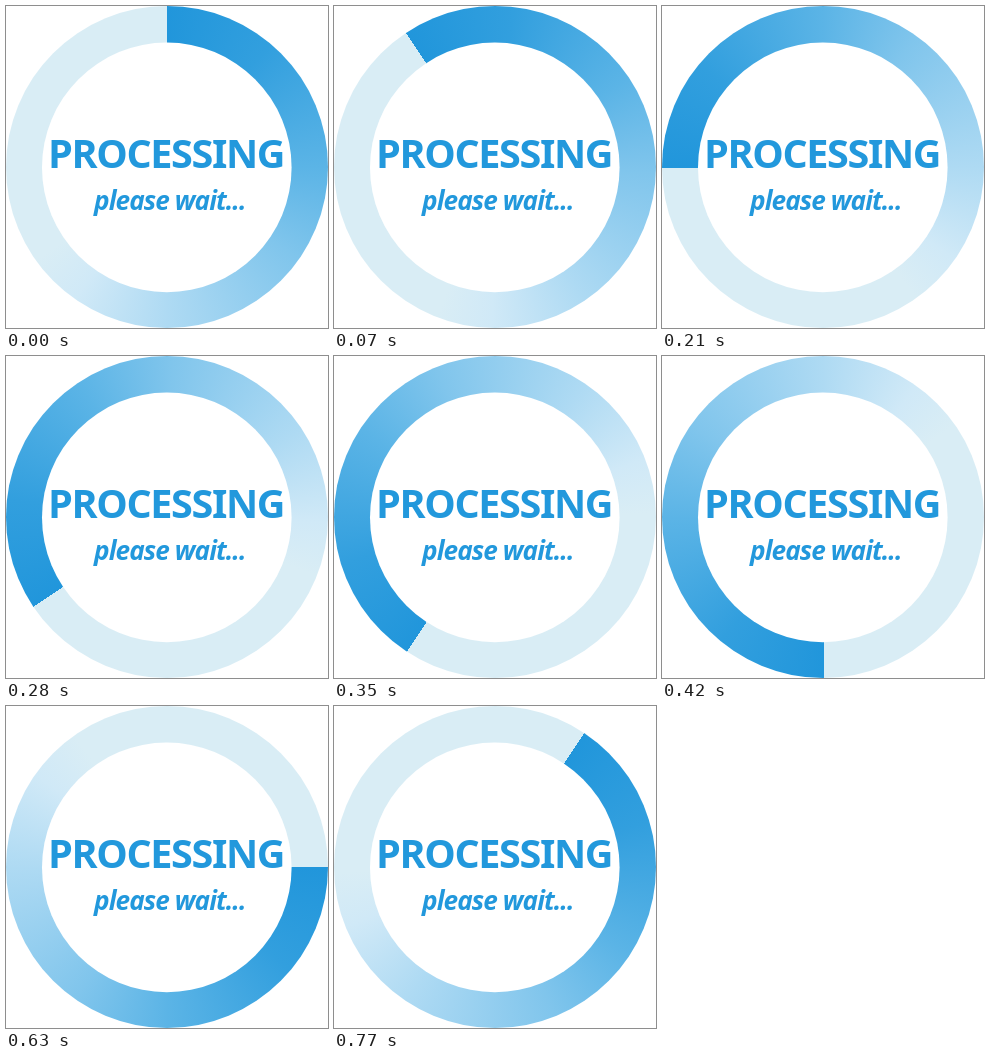
Recreate the animation shown at these times as an HTML page with a canvas. Size 322 px wide and 322 px high, loop 0.84 s.

```html
<!DOCTYPE html>
<html lang="en">
<head>
<meta charset="utf-8">
<title>Processing</title>
<style>
  html, body { margin: 0; width: 100%; height: 100%; overflow: hidden; background: #fff; }
  canvas { display: block; width: 322px; height: 322px; }
</style>
</head>
<body>
<canvas id="stage" width="322" height="322"></canvas>
<script>
const SIZE = 322, CENTER = SIZE / 2;
const OUTER = 161, INNER = 124.8;
const STEP_MS = 70, STEPS = 12;
const BLUE = '#2298dc';
const FAMILY = '"Noto Sans", "Open Sans", sans-serif';

// The head turns in uneven steps that repeat every quarter turn.
const QUARTER = [0, 33.5, 56.5];

// Clockwise distance from the head in degrees, and the colour there.
const TAIL = [
  [0, '#2196db'], [40, '#329fde'], [90, '#5bb4e6'], [125, '#80c5ec'],
  [180, '#aedaf3'], [215, '#d0e9f7'], [235, '#d9edf5'], [360, '#d9edf5']
];

const ctx = document.getElementById('stage').getContext('2d');

function headAngle(step) {
  return Math.floor(step / 3) * 90 + QUARTER[step % 3];
}

function drawRing(step) {
  const start = -(90.1 + headAngle(step)) * Math.PI / 180;
  const gradient = ctx.createConicGradient(start, CENTER + 0.5, CENTER + 0.5);
  for (const [angle, color] of TAIL) gradient.addColorStop(angle / 360, color);
  ctx.fillStyle = gradient;
  ctx.beginPath();
  ctx.arc(CENTER, CENTER, OUTER, 0, Math.PI * 2);
  ctx.fill();
  ctx.fillStyle = '#fff';
  ctx.beginPath();
  ctx.arc(CENTER - 0.2, CENTER + 0.4, INNER, 0, Math.PI * 2);
  ctx.fill();
}

function setFont(style, size) {
  ctx.font = `${style} ${size}px ${FAMILY}`;
  ctx.fontStretch = 'semi-condensed';
  ctx.letterSpacing = `${-0.035 * size}px`;
}

// Picks the font size whose ink spans left to right, centred on middle.
function drawLabel(text, style, left, right, middle, sample) {
  const ink = m => m.actualBoundingBoxLeft + m.actualBoundingBoxRight;
  setFont(style, 100);
  setFont(style, 100 * (right - left) / ink(ctx.measureText(text)));
  const box = ctx.measureText(text);
  const height = ctx.measureText(sample).actualBoundingBoxAscent;
  ctx.fillStyle = BLUE;
  ctx.fillText(text, left + box.actualBoundingBoxLeft, middle + height / 2);
}

function draw(now) {
  const step = Math.floor(now / STEP_MS) % STEPS;
  ctx.fillStyle = '#fff';
  ctx.fillRect(0, 0, SIZE, SIZE);
  drawRing(step);
  drawLabel('PROCESSING', '600', 45, 276, 148, 'E');
  drawLabel('please wait...', 'italic 600', 87, 238, 193, 'l');
}

let origin;
function tick(now) {
  origin ??= now;
  draw(Math.max(0, now - origin));
  requestAnimationFrame(tick);
}

draw(0);
requestAnimationFrame(tick);
</script>
</body>
</html>
```
